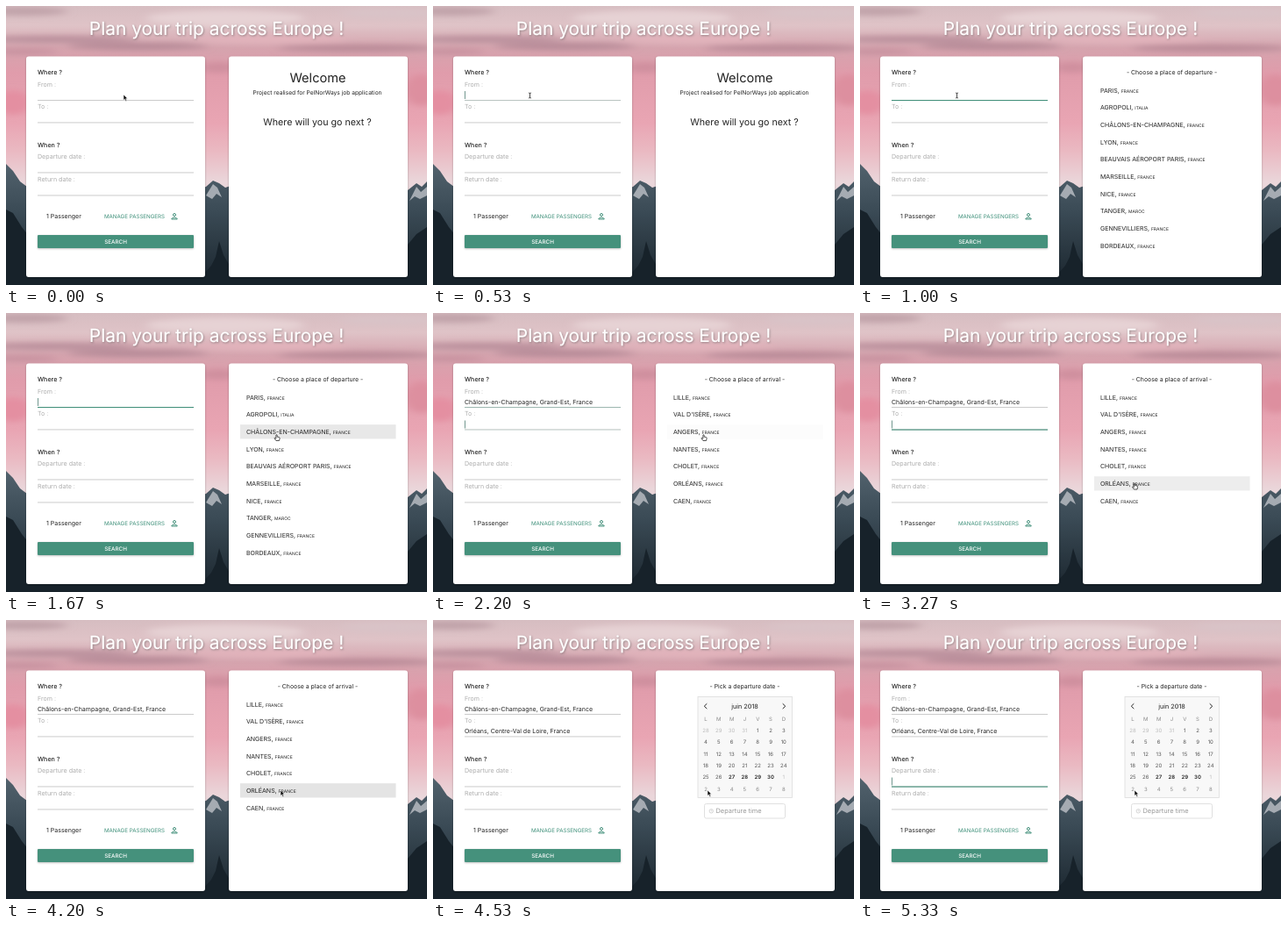
An HTML page that plays this animation: 480 px wide and 318 px high, repeating every 5540 ms.

```html
<!DOCTYPE html>
<html lang="en">
<head>
<meta charset="utf-8">
<title>Trip planner</title>
<style>
  html, body { margin: 0; height: 100%; overflow: hidden; background: #1c262d; }
  svg { display: block; width: 100vw; height: 100vh; font-family: Inter, "Open Sans", sans-serif; }
  text { font-size: 7px; fill: #222; white-space: pre; text-rendering: geometricPrecision; }
  .mid { text-anchor: middle; }
  .label { font-size: 7.1px; fill: #adadad; }
  .head { font-size: 7.1px; font-weight: 500; }
  .green { fill: #3d8f79; font-size: 6.2px; }
  .country { font-size: 5px; }
  .day { font-size: 6px; text-anchor: middle; }
</style>
</head>
<body>
<svg id="stage" viewBox="0 0 480 318" preserveAspectRatio="none">
  <defs>
    <linearGradient id="sky" x2="0" y2="1">
      <stop offset="0" stop-color="#d6bdc1"/>
      <stop offset=".07" stop-color="#dfc3c7"/>
      <stop offset=".15" stop-color="#d5a4ae"/>
      <stop offset=".24" stop-color="#e09cab"/>
      <stop offset=".42" stop-color="#e9a5b3"/>
      <stop offset=".52" stop-color="#eab9c2"/>
      <stop offset=".63" stop-color="#ead6da"/>
    </linearGradient>
    <linearGradient id="hill" x2="0" y2="1">
      <stop offset="0" stop-color="#52626d"/>
      <stop offset=".4" stop-color="#3a4a55"/>
      <stop offset="1" stop-color="#1a252d"/>
    </linearGradient>
    <filter id="soft" x="-30%" y="-100%" width="160%" height="300%"><feGaussianBlur stdDeviation="6 3"/></filter>
    <filter id="lift" x="-10%" y="-10%" width="120%" height="130%">
      <feDropShadow dx="0" dy=".8" stdDeviation=".8" flood-opacity=".28"/>
    </filter>
    <filter id="glow" x="-5%" y="-30%" width="110%" height="180%">
      <feDropShadow dx=".8" dy="1" stdDeviation="1.2" flood-color="#444" flood-opacity=".5"/>
    </filter>
  </defs>
</svg>
<script>
const LOOP = 5540, GREEN = '#45917c';
const stage = document.getElementById('stage');
const clamp = v => Math.max(0, Math.min(1, v));
const smooth = v => v * v * (3 - 2 * v);

const text = (x, y, s, cls = '', attrs = '') => `<text x="${x}" y="${y}" class="${cls}" ${attrs}>${s}</text>`;
const rect = (x, y, w, h, attrs) => `<rect x="${x}" y="${y}" width="${w}" height="${h}" ${attrs}/>`;
const path = (d, attrs) => `<path d="${d}" ${attrs}/>`;
const group = (id, body, attrs = '') => `<g id="${id}" ${attrs}>${body}</g>`;
const cloud = (x, y, rx, ry, color) => `<ellipse cx="${x}" cy="${y}" rx="${rx}" ry="${ry}" fill="${color}"/>`;

const scenery = rect(0, 0, 480, 318, 'fill="url(#sky)"') +
  group('clouds',
    cloud(20, 6, 50, 5, '#c0a2a9') + cloud(250, 14, 90, 9, '#e6d2d4') + cloud(440, 8, 60, 6, '#d9c3c7') +
    cloud(60, 38, 90, 4, '#b98f9b') + cloud(150, 46, 80, 4, '#b68a97') + cloud(20, 52, 40, 3, '#c58f9d') +
    cloud(300, 38, 90, 4, '#e3b3bc') + cloud(400, 48, 90, 4, '#b98b98') + cloud(242, 70, 20, 6, '#cf8f9e') +
    cloud(8, 110, 20, 14, '#e48fa1') + cloud(474, 96, 20, 18, '#dd8f9f'),
    'filter="url(#soft)"') +
  path('M0 180L8 188 16 200 24 206 140 232 228 206 236 199 243 202 250 207 256 205 330 225 440 218 458 210 468 202 474 206 480 200V318H0Z', 'fill="url(#hill)"') +
  path('M228 216L236 203 241 207 246 218 240 214 235 220ZM460 222L468 206 473 212 480 206V216L472 220 466 217Z', 'fill="#a5abb2"') +
  path('M0 232L8 236 18 252 26 262 60 296 225 306 234 296 239 286 243 268 248 284 255 296 300 306 440 296 458 272 468 260 480 252V318H0Z', 'fill="#17222a"');

// Left card
const fields = [['From :', 107.5], ['To :', 133], ['Departure date :', 190], ['Return date :', 216]];
const card = x => rect(x, 57.5, 204, 251.5, 'rx="3" fill="#fff" filter="url(#lift)"');
const form = card(23) + text(36, 78, 'Where ?', 'head') + text(36, 161, 'When ?', 'head') +
  fields.map(([label, y], i) =>
    text(36, y - 16, label, 'label') +
    rect(36, y - .4, 178, .7, 'fill="#b5b5b5"') +
    rect(36, y - .5, 178, 1.1, `id="line${i}" fill="${GREEN}"`) +
    rect(36, y - 10.5, .8, 9, `id="caret${i}" fill="#4f7f73"`)).join('') +
  text(36, 103.6, 'Châlons-en-Champagne, Grand-Est, France', '', 'id="value0"') +
  text(36, 129.2, 'Orléans, Centre-Val de Loire, France', '', 'id="value1"') +
  text(46, 242.2, '1 Passenger') +
  text(112, 242, 'MANAGE PASSENGERS', 'green') +
  `<g fill="none" stroke="${GREEN}"><circle cx="192" cy="238" r="1.5"/>` +
  path('M188.8 243V242.3Q192 239.6 195.2 242.3V243Z', '') + '</g>' +
  rect(36, 261, 178, 15, `rx="1" fill="${GREEN}" filter="url(#lift)"`) +
  text(125, 270.8, 'SEARCH', 'mid', 'style="fill:#fff;font-size:6.3px;font-weight:500"');

// Right card
const rowY = i => 98.5 + 19.67 * i;
const list = (id, title, places) => group(id,
  text(355.5, 78, title, 'mid', 'style="font-size:6.9px"') +
  places.map((place, i) => {
    const [city, country = 'FRANCE'] = place.split('|');
    return rect(267, rowY(i) - 10.7, 177.5, 16.3, `id="${id}${i}" fill="#e4e4e4"`) +
      text(274, rowY(i), `${city}, <tspan class="country">${country}</tspan>`);
  }).join(''));

const welcome = group('welcome',
  text(355.5, 87, 'Welcome', 'mid', 'style="font-size:14.6px"') +
  text(355, 101, 'Project realised for PelNorWays job application', 'mid', 'style="font-size:6.65px"') +
  text(355, 136.3, 'Where will you go next ?', 'mid', 'style="font-size:10.7px"'));

const dayX = i => 311 + 14.8 * (i % 7);
const days = Array.from({ length: 42 }, (_, i) => {
  const n = i - 3, inside = n > 0 && n < 31;
  const label = n < 1 ? n + 31 : n > 30 ? n - 30 : n;
  const color = inside ? (n > 26 ? '#222' : '#555') : i > 34 ? '#888' : '#bbb';
  return text(dayX(i), 127.7 + 13.4 * Math.floor(i / 7), label, 'day',
    `style="fill:${color};font-weight:${inside && n > 26 ? 600 : 400}"`);
}).join('');
const calendar = group('calendar',
  text(355.5, 78, '- Pick a departure date -', 'mid', 'style="font-size:6.9px"') +
  rect(302, 87.5, 107.5, 115, 'fill="#f8f8f8" stroke="#ddd" stroke-width=".8"') +
  path('M312.3 95.3L309.3 98.2 312.3 101.1M398.7 95.3L401.7 98.2 398.7 101.1', 'fill="none" stroke="#222"') +
  text(355.5, 100.8, 'juin 2018', 'mid', 'style="font-size:7.3px"') +
  [...'LMMJVSD'].map((d, i) => text(dayX(i), 114.5, d, 'day', 'style="fill:#888"')).join('') + days +
  rect(309.5, 209.5, 92, 16.5, 'rx="2" fill="#fff" stroke="#ddd" stroke-width=".9"') +
  '<circle cx="317.3" cy="217.8" r="2.2" fill="none" stroke="#bbb" stroke-width=".6"/>' +
  path('M317.3 216.4V217.9H318.4', 'fill="none" stroke="#bbb" stroke-width=".5"') +
  text(322.5, 220.3, 'Departure time', '', 'style="fill:#999;font-size:7.4px"'));

const pointers =
  group('arrow', path('M0 0V6.3L1.5 5 2.6 7.4 3.7 6.9 2.7 4.6H4.6Z', 'fill="#111" stroke="#fff" stroke-width=".5"')) +
  group('beam', path('M-1.4 -3Q0 -3 0 -2V2Q0 3 -1.4 3M1.4 -3Q0 -3 0 -2M0 2Q0 3 1.4 3', 'fill="none" stroke="#222" stroke-width=".8"')) +
  group('hand', path('M-.6 .6Q0 -.3 .6 .6V2.6L3 3.1Q3.7 3.3 3.6 4.4L3 7H-.6L-2.6 4.2Q-2.2 3.2 -.6 4.6Z', 'fill="#fff" stroke="#111" stroke-width=".7"'));

stage.innerHTML += scenery +
  text(240, 32.5, 'Plan your trip across Europe !', 'mid', 'style="fill:#fff;font-size:20.9px" filter="url(#glow)"') +
  form + card(254) + welcome +
  list('departure', '- Choose a place of departure -', ['PARIS', 'AGROPOLI|ITALIA', 'CHÂLONS-EN-CHAMPAGNE', 'LYON',
    'BEAUVAIS AÉROPORT PARIS', 'MARSEILLE', 'NICE', 'TANGER|MAROC', 'GENNEVILLIERS', 'BORDEAUX']) +
  list('arrival', '- Choose a place of arrival -', ['LILLE', 'VAL D\'ISÈRE', 'ANGERS', 'NANTES', 'CHOLET', 'ORLÉANS', 'CAEN']) +
  calendar + group('cursor', pointers);

const el = id => document.getElementById(id);
const show = (id, on) => { el(id).style.display = on ? '' : 'none'; };
const fade = (id, v) => { el(id).style.opacity = v; };

// Opacity of something switched on at `start` and off at `end`
const pulse = (t, start, end, inMs, outMs) =>
  clamp(clamp((Math.min(t, end) - start) / inMs) - clamp((t - end) / outMs));

const panels = [['welcome', 0, 600], ['departure', 600, 2170], ['arrival', 2170, 4330], ['calendar', 4330, LOOP]];
// Start, end and fade-out time for each field; the last one is never focused
const focuses = [[500, 2000, 300], [2170, 3670, 1], [5070, LOOP, 300], [LOOP, LOOP, 300]];
const hovers = [['departure2', 1460, 2170], ['arrival2', 2170, 2923], ['arrival3', 2923, 3022],
  ['arrival4', 3022, 3105], ['arrival5', 3105, 4330]];
const moves = [[70, 330, 110.5, 102], [1200, 1640, 308.5, 138.5], [2870, 3200, 313, 194]];

function cursorAt(t) {
  let x = 134, y = 101;
  for (const [start, end, toX, toY] of moves) {
    const p = smooth(clamp((t - start) / (end - start)));
    x += (toX - x) * p;
    y += (toY - y) * p;
  }
  return [x, y];
}

function draw(t) {
  for (const [id, start, end] of panels) show(id, t >= start && t < end);
  focuses.forEach(([start, end, outMs], i) => {
    fade('line' + i, pulse(t, start, end, 250, outMs));
    show('caret' + i, t >= start && t < end && (t - start) % 1000 < 500);
  });
  for (const list of ['departure', 'arrival'])
    for (let i = 0; el(list + i); i++) fade(list + i, 0);
  for (const [id, start, end] of hovers) fade(id, pulse(t, start, end, 250, 250));
  show('value0', t >= 2170);
  show('value1', t >= 4330);

  const [x, y] = cursorAt(t);
  const kind = t < 70 || t >= 4130 ? 'arrow' : x < 214 ? 'beam' : x < 267 ? 'arrow' : 'hand';
  for (const id of ['arrow', 'beam', 'hand']) show(id, id === kind);
  el('cursor').setAttribute('transform', `translate(${x} ${y})`);
}

const begin = performance.now();
function tick() {
  draw((performance.now() - begin) % LOOP);
  requestAnimationFrame(tick);
}
tick();
</script>
</body>
</html>
```
